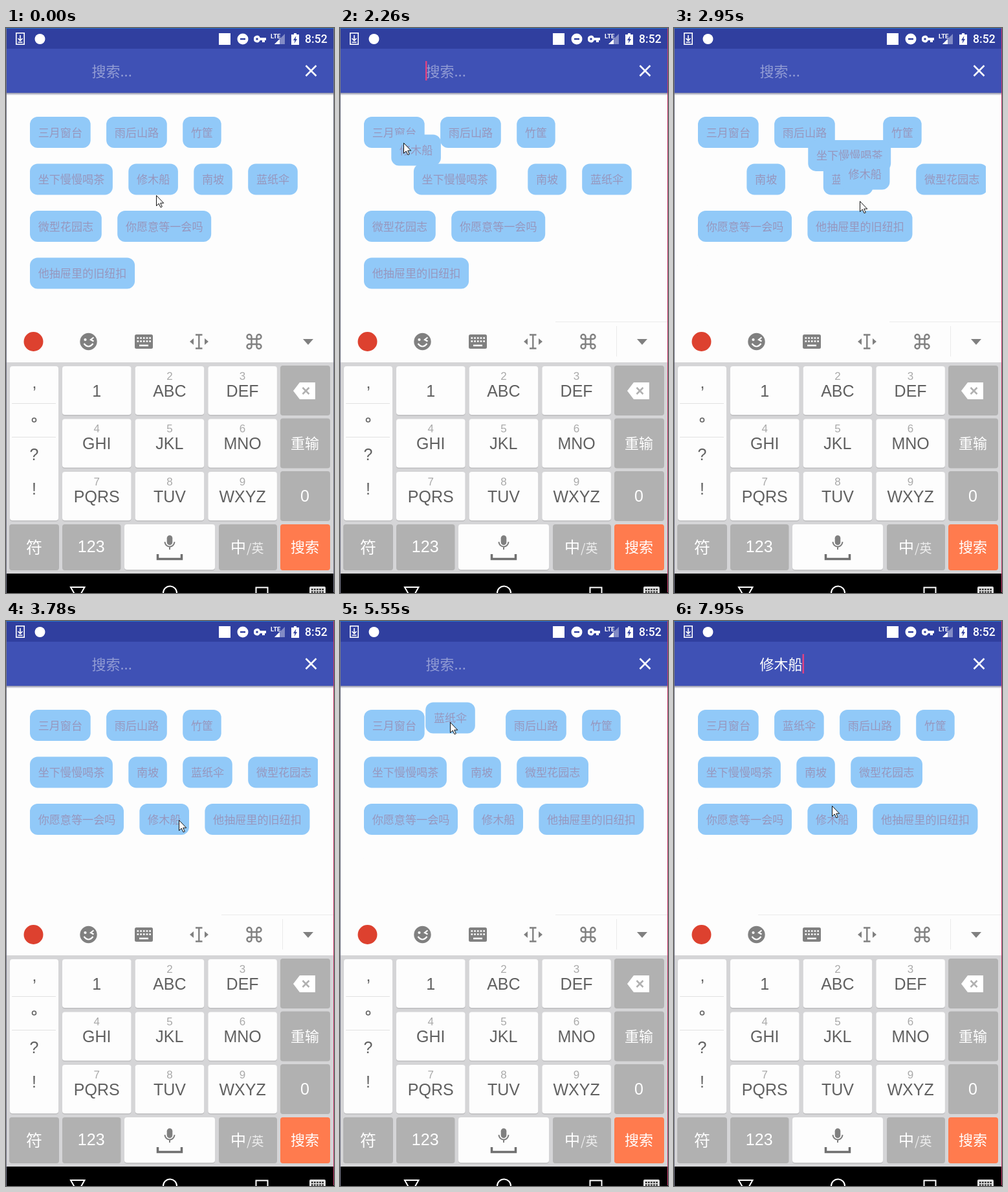
These frames come from a looping animation (507 px wide and 872 px high, 8000 ms). An HTML page:

```html
<!DOCTYPE html>
<html lang="zh">
<head>
<meta charset="utf-8">
<title>Draggable tags</title>
<style>
  html, body { margin: 0; width: 100%; height: 100%; overflow: hidden; background: #fdfdfd; }
  svg { display: block; width: 100%; height: 100%; }
  text { font-family: "Noto Sans CJK SC", "Noto Sans CJK", sans-serif; }
  .latin { font-family: "Liberation Sans", sans-serif; }
  .status { font-family: Roboto, sans-serif; }
  .mid { text-anchor: middle; }
  .chip rect { fill: #91c9f8; }
  .chip text { fill: #9796bd; font-size: 17.1px; }
</style>
</head>
<body>
<svg viewBox="0 0 507 872">
  <defs>
    <clipPath id="flow"><rect x="36" y="101" width="446" height="340"/></clipPath>
    <linearGradient id="shade" x2="0" y2="1">
      <stop stop-color="#8a8da3"/><stop offset="1" stop-color="#fdfdfd"/>
    </linearGradient>
  </defs>
  <rect width="507" height="872" fill="#fdfdfd"/>

  <!-- status bar -->
  <rect width="507" height="32" fill="#303f9f"/>
  <g fill="none" stroke="#fff" stroke-width="1.6">
    <rect x="15.8" y="7.8" width="12.4" height="17.4"/>
    <path d="M22 11V19M18.5 16L22 19.5L25.5 16M18.5 22H25.5"/>
  </g>
  <g fill="#fff">
    <circle cx="52.5" cy="17" r="8"/>
    <rect x="329" y="8" width="18" height="18"/>
    <circle cx="366" cy="17" r="8.5"/>
    <path d="M383 17a5 5 0 0 1 9.7-2H402V19H400V22H396V19H392.7A5 5 0 0 1 383 17Z"/>
    <path d="M431 9V25H415Z" opacity=".4"/>
    <path d="M423 17V25H415Z"/>
    <path d="M445 8H449V10H453V26H441V10H445Z"/>
    <text class="status" x="409" y="16" font-size="9.5" font-weight="700">LTE</text>
    <text class="status" x="462" y="23.2" font-size="17.6" font-weight="500">8:52</text>
  </g>
  <circle cx="388" cy="17" r="1.8" fill="#303f9f"/>
  <path d="M362 17H370" stroke="#303f9f" stroke-width="2.5"/>
  <path d="M448.5 12L444 19H446.5L445.5 24L450 17H447.5Z" fill="#303f9f"/>

  <!-- search bar -->
  <rect y="32" width="507" height="68" fill="#3f51b5"/>
  <rect y="100" width="507" height="4" fill="url(#shade)"/>
  <text id="query" x="132.5" y="74.5" font-size="22"></text>
  <rect id="caret" y="51" width="2.5" height="30" fill="#dc4283"/>
  <path d="M463.5 58L479.5 74M479.5 58L463.5 74" stroke="#fff" stroke-width="2.5"/>

  <g id="tags" clip-path="url(#flow)"></g>
  <g id="lifted"></g>

  <!-- keyboard toolbar -->
  <g id="rules" stroke="#ebebeb">
    <path id="topRule"/><path d="M427.5 460V507"/>
  </g>
  <circle cx="42.5" cy="484" r="15" fill="#dd412f"/>
  <g fill="#808080">
    <circle cx="127.5" cy="484" r="13.2"/>
    <rect x="199" y="473" width="28" height="22" rx="2.5"/>
    <path d="M290 479V489L284 484ZM307 479V489L313 484Z"/>
    <path d="M459 480H475L467 489Z"/>
  </g>
  <g fill="none" stroke="#fdfdfd" stroke-width="2.2">
    <circle cx="122.5" cy="481" r="1"/>
    <path d="M135.5 477.5L131 481L135.5 483.5M120.5 487Q127.5 496 134.5 487"/>
    <path d="M202.5 478.5H224M202.5 483.5H224" stroke-width="2.5" stroke-dasharray="2.7 2"/>
    <path d="M206 490H220" stroke-width="2.5"/>
  </g>
  <g fill="none" stroke="#808080" stroke-width="2.4">
    <path d="M293 473.5H303.5M293 494.5H303.5M298.3 473.5V494.5"/>
    <path transform="translate(383.5 484)" d="M4-4V-7.5a3.5 3.5 0 1 1 3.5 3.5H-7.5a3.5 3.5 0 1 1 3.5-3.5V7.5a3.5 3.5 0 1 1-3.5-3.5H7.5a3.5 3.5 0 1 1-3.5 3.5Z"/>
  </g>

  <!-- keyboard -->
  <rect y="516" width="507" height="326" fill="#d5d5d7"/>
  <g id="keys"></g>
  <path d="M9 579.5H77M9 631.5H77" stroke="#e2e2e2"/>
  <circle cx="43.5" cy="605" r="3" fill="none" stroke="#606060" stroke-width="1.6"/>
  <path d="M444 560L454 547H478V573H454Z" fill="#fff"/>
  <path d="M458.5 555L468.5 565M468.5 555L458.5 565" stroke="#b1b1b1" stroke-width="2.5"/>
  <rect x="248.7" y="783" width="8.6" height="15" rx="4.3" fill="#808080"/>
  <path d="M245.5 793a7.5 7.5 0 0 0 15 0M253 800.5V805" fill="none" stroke="#808080" stroke-width="2"/>
  <path d="M234.5 812V819.5H271.5V812" fill="none" stroke="#707070" stroke-width="3.5"/>

  <!-- navigation bar -->
  <rect y="842" width="507" height="30" fill="#000"/>
  <g fill="none" stroke="#fff" stroke-width="2">
    <path d="M100 863H121.5L110.8 882Z"/>
    <circle cx="253.5" cy="872" r="10.5"/>
    <rect x="386.5" y="863.5" width="18" height="18"/>
  </g>
  <rect x="469" y="862" width="25" height="18" rx="2" fill="#ddd"/>
  <path d="M472 866.5H491M472 870.5H491" stroke="#000" stroke-width="2" stroke-dasharray="2.5 1.6"/>

  <!-- window edges -->
  <path d="M.5 0V872" stroke="#77798a"/>
  <path d="M0 .5H507" stroke="#2672c8"/>
  <path id="rightEdge" d="M506.5 0V871"/>

  <path id="pointer" d="M.5.5V16.5L4.2 13L7 18.8L9.3 17.8L6.7 12.2H11.7Z" fill="#fff" stroke="#111"/>
</svg>
<script>
const LOOP = 8000;
const SHIFT = 200;          // ms a tag takes to slide to its neighbour's place
const LAG = 50;             // ms a lifted tag trails the pointer
const SPEED = 1.1;          // pointer px per ms
const BLINK = 470;
const TAP = 7600;
const $ = id => document.getElementById(id);

function make(parent, tag, attrs, text = '') {
  const node = document.createElementNS('http://www.w3.org/2000/svg', tag);
  for (const name in attrs) node.setAttribute(name, attrs[name]);
  node.textContent = text;
  return parent.appendChild(node);
}

// Keyboard
const INK = '#606060', GRAY = '#b1b1b1', WHITE = '#fdfdfd';
function key(x, y, width, height, fill) {
  const box = { x, width, height, rx: 4 };
  if (fill === WHITE) make($('keys'), 'rect', { ...box, y: y + 1.5, fill: '#bdbdbf' });
  make($('keys'), 'rect', { ...box, y, fill });
}
function label(text, x, y, size, fill, cls = 'mid latin') {
  make($('keys'), 'text', { x, y, 'font-size': size, fill, class: cls }, text);
}
key(6, 522, 75, 238, WHITE);
label(',', 44, 556, 25, INK);
label('?', 43.5, 667, 25, INK);
label('!', 43.5, 720, 25, INK);
['1', 'ABC', 'DEF', 'GHI', 'JKL', 'MNO', 'PQRS', 'TUV', 'WXYZ'].forEach((letters, i) => {
  const x = 87 + i % 3 * 112.7, y = 522 + Math.floor(i / 3) * 81.5;
  key(x, y, 106.5, 75, WHITE);
  label(letters, x + 53.2, y + 46.7, 25, INK);
  if (i) label(i + 1, x + 53.2, y + 20.5, 17, '#a9a9a9');
});
for (let i = 0; i < 3; i++) key(424, 521 + i * 81.5, 77, 77, GRAY);
label('重输', 462, 649, 22, '#fff', 'mid');
label('0', 462, 731, 25, '#fff');
key(5, 766, 77, 71, GRAY);
key(87, 766, 90.5, 71, GRAY);
key(183, 766, 140, 70, WHITE);
key(329, 766, 90, 71, GRAY);
key(424, 766, 77, 71, '#ff7b4e');
label('符', 43.5, 810.5, 25, '#fff', 'mid');
label('123', 131.7, 809, 25, '#fff');
label('中', 347, 810, 24, '#fff', '');
label('/英', 372, 810, 19, '#eee', '');
label('搜索', 462, 809, 22, '#fff', 'mid');

// Tags
const names = ['三月窗台', '雨后山路', '竹筐', '坐下慢慢喝茶', '修木船', '南坡',
  '蓝纸伞', '微型花园志', '你愿意等一会吗', '他抽屉里的旧纽扣'];
const BOAT = 4, UMBRELLA = 6;
const widthOf = id => names[id].length * 17.1 + 25.3;
const chips = names.map((name, id) => {
  const chip = make($('tags'), 'g', { class: 'chip' });
  make(chip, 'rect', { width: widthOf(id), height: 48, rx: 12 });
  make(chip, 'text', { x: 12.7, y: 30.5 }, name);
  return chip;
});

// A lifted tag changes index; the new order then wraps into rows.
const moves = [
  { at: 2160, from: 4, to: 3, rows: [4, 4, 2] },
  { at: 2480, from: 3, to: 2, rows: [4, 4, 2] },
  { at: 2850, from: 2, to: 6, rows: [3, 4, 2, 1] },
  { at: 3060, from: 6, to: 8, rows: [3, 4, 3] },
  { at: 5030, from: 5, to: 2, rows: [4, 3, 3] },
  { at: 5260, from: 2, to: 1, rows: [4, 3, 3] }
];
const drags = [
  { id: BOAT, lift: 1840, drop: 3270 },
  { id: UMBRELLA, lift: 4700, drop: 5780 }
];

// Places the pointer visits, with arrival times; it rests until it has to leave.
const stops = [
  [0, 232, 258], [270, 232, 238], [1210, 202, 225], [1450, 241, 225], [1920, 294, 285],
  [2210, 131, 180], [2260, 98, 177], [2600, 330, 150], [2900, 309, 216], [2950, 287, 267],
  [3270, 258, 298], [3780, 267, 307], [4030, 285, 225], [4290, 325, 225], [4960, 309, 171],
  [5500, 184, 141], [5550, 170, 156], [5950, 60, 200], [6150, 150, 345], [6580, 367, 352],
  [6850, 379, 505], [7260, 254, 316], [7950, 244, 285]
];

const mix = (a, b, p) => a.map((v, i) => v + (b[i] - v) * p);

function pointerAt(t) {
  const next = stops.findIndex(stop => stop[0] > t);
  if (next < 0) return stops[stops.length - 1].slice(1);
  const [left, ...a] = stops[next - 1], [arrive, ...b] = stops[next];
  const time = Math.min(arrive - left, Math.hypot(b[0] - a[0], b[1] - a[1]) / SPEED);
  return mix(a, b, Math.max(0, 1 - (arrive - t) / time));
}

function slotsFor(order, rows) {
  const slots = [];
  rows.forEach((count, row) => {
    for (let x = 37; count--;) {
      slots.push([x, 137 + row * 72.5]);
      x += widthOf(order[slots.length - 1]) + 24.4;
    }
  });
  return slots;
}

function tagPlaces(t) {
  const order = names.map((_, id) => id);
  let rows = [3, 4, 2, 1], sliding = null;
  for (const move of moves) {
    if (t < move.at) break;
    if (t < move.at + SHIFT) { sliding = move; break; }
    order.splice(move.to, 0, order.splice(move.from, 1)[0]);
    rows = move.rows;
  }
  const slots = slotsFor(order, rows), places = [];
  order.forEach((id, i) => {
    places[id] = slots[i];
    if (!sliding) return;
    const { from, to, at } = sliding, step = Math.sign(from - to);
    const passed = (i - from) * step < 0 && (i - to) * step >= 0;
    if (passed) places[id] = mix(slots[i], slots[i + step], (t - at) / SHIFT);
  });
  return places;
}

function liftedPlace({ id, lift }, t) {
  const slot = tagPlaces(lift)[id], grip = pointerAt(lift);
  const hand = pointerAt(Math.max(lift, t - LAG));
  return slot.map((v, i) => v + hand[i] - grip[i]);
}

const place = (node, [x, y]) => node.setAttribute('transform', `translate(${x} ${y})`);

function draw(t) {
  const places = tagPlaces(t);
  const drag = drags.find(d => t >= d.lift && t < d.drop);
  if (drag) places[drag.id] = liftedPlace(drag, t);
  chips.forEach((chip, id) => {
    const home = drag && drag.id === id ? $('lifted') : $('tags');
    if (chip.parentNode !== home) home.appendChild(chip);
    place(chip, places[id]);
  });
  place($('pointer'), pointerAt(t));

  const chosen = t >= TAP;
  $('query').textContent = chosen ? names[BOAT] : '搜索...';
  $('query').setAttribute('fill', chosen ? '#fff' : '#929cd4');
  const blinks = Math.floor((t - (chosen ? TAP : 230)) / BLINK);
  $('caret').setAttribute('x', chosen ? 198.5 : 132);
  $('caret').setAttribute('opacity', blinks % 2 ? 0 : 1);

  $('rules').setAttribute('opacity', t < 530 ? 0 : 1);
  $('topRule').setAttribute('d', `M${t < 7000 ? 333 : 130} 453.5H507`);
  $('rightEdge').setAttribute('stroke', t < 530 ? '#77798a' : '#c63a6b');
}

function tick() {
  draw(performance.now() % LOOP);
  requestAnimationFrame(tick);
}
tick();
</script>
</body>
</html>
```
